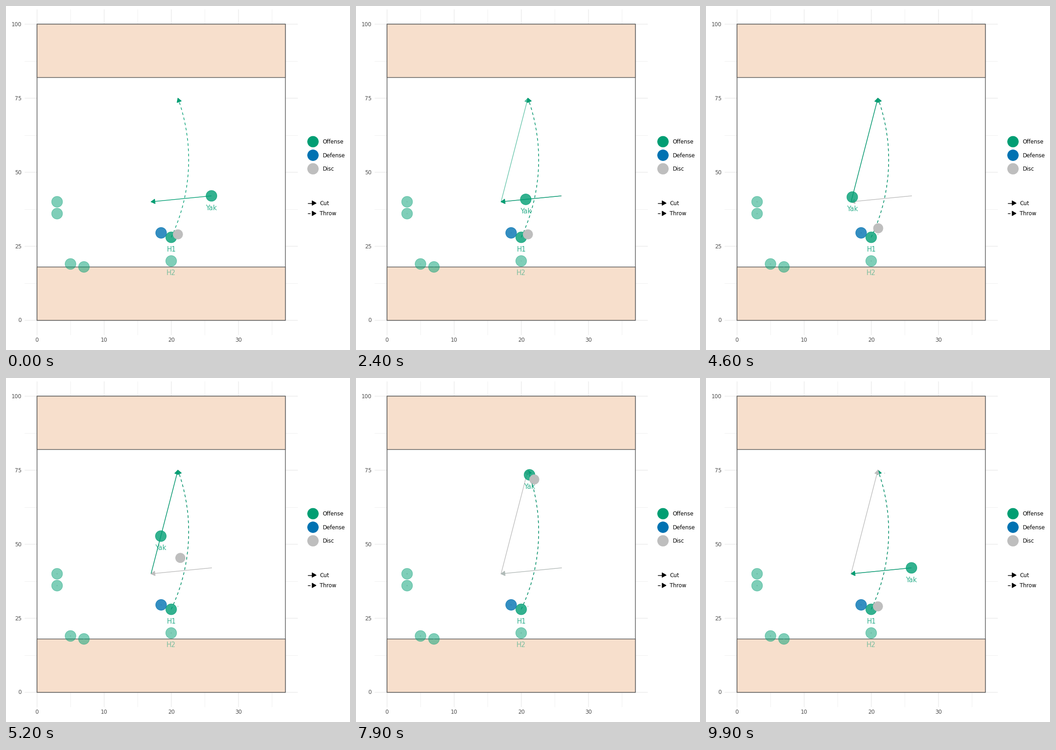
Write a matplotlib script that moves like this. It is 748 px wide and 748 px high and loops after 10 s.

```python
import numpy as np
import matplotlib.pyplot as plt
from matplotlib.animation import FuncAnimation
from matplotlib.patches import Circle, Polygon, Rectangle

SIZE, DPI = 748, 96
GREEN, BLUE, GREY = "#009E73", "#0072B2", "#BEBEBE"
LEFT, RIGHT, TOP, BOTTOM = 40.3, 634.3, 7.3, 715.4   # panel edges in px
LINE = 1.42                                          # base line weight in px

STILL = [(3, 40), (3, 36), (5, 19), (7, 18), (20, 20)]
HANDLER, MARKER = (20, 28), (18.5, 29.5)
CUTTER = [(26, 42), (17, 40), (21, 75)]
DISC = [(21, 29), (21, 29), (22, 74)]
MOVES = [(11, 33), (45, 67), (79, 100)]              # start and end of each move
FRAMES = 100

plt.rcParams["font.family"] = "DejaVu Sans"
fig = plt.figure(figsize=(SIZE / DPI, SIZE / DPI), dpi=DPI, facecolor="white")
ax = fig.add_axes([0, 0, 1, 1])
ax.set(xlim=(0, SIZE), ylim=(SIZE, 0))
ax.axis("off")


def pt(px):
    return px * 72 / DPI


def pos(x, y):
    """Field coordinates to stage pixels."""
    return np.array([LEFT + (RIGHT - LEFT) * (x + 1.85) / 40.7,
                     BOTTOM - (BOTTOM - TOP) * (y + 5) / 110])


def text(x, y, s, size=8.8, **kw):
    """Text with its capitals centred on y."""
    return ax.text(x, y + 0.365 * size * DPI / 72, s, fontsize=size,
                   va="baseline", **kw)


def dot(xy, r, color, alpha=1, z=8):
    return ax.add_patch(Circle(xy, r, fc=color, ec=color, alpha=alpha,
                               lw=pt(0.94), zorder=z))


def arrow(path, color, z, dashed=False):
    path = np.asarray(path, float)
    style = (0, (4, 4)) if dashed else "-"
    line, = ax.plot(*path.T, color=color, lw=pt(LINE), ls=style, zorder=z,
                    solid_capstyle="butt", dash_capstyle="butt")
    tip = path[-1]
    back = path[-2] - tip
    turn = np.arctan2(back[1], back[0]) + np.radians([-30, 30])
    wings = tip + 9.6 * np.c_[np.cos(turn), np.sin(turn)]
    head = ax.add_patch(Polygon(np.vstack([wings[0], tip, wings[1]]), fc=color,
                                ec=color, lw=pt(LINE), joinstyle="round",
                                zorder=z))
    return [line, head]


def arc(a, b, bulge=0.1, n=80):
    """Circular arc from a to b; bulge is its height over the chord."""
    chord = b - a
    length = np.hypot(*chord)
    along = chord / length
    side = np.array([-along[1], along[0]])
    half, rise = length / 2, bulge * length
    radius = (half ** 2 + rise ** 2) / (2 * rise)
    theta = np.linspace(-1, 1, n) * np.arcsin(half / radius)
    u = radius * np.sin(theta)
    v = radius * np.cos(theta) - (radius - rise)
    return (a + b) / 2 + u[:, None] * along + v[:, None] * side


def draw_field():
    for xs, ys, w in [(range(5, 40, 10), np.arange(12.5, 100, 25), LINE / 2),
                      (range(0, 40, 10), range(0, 101, 25), LINE)]:
        style = dict(color="#EBEBEB", lw=pt(w), zorder=0, solid_capstyle="butt")
        for x in xs:
            ax.plot([pos(x, 0)[0]] * 2, [TOP, BOTTOM], **style)
        for y in ys:
            ax.plot([LEFT, RIGHT], [pos(0, y)[1]] * 2, **style)
    for y0, y1, fill in [(0, 100, "white"), (0, 18, "#F7DFCC"), (82, 100, "#F7DFCC")]:
        a, b = pos(0, y0), pos(37, y1)
        ax.add_patch(Rectangle(a, *(b - a), fc=fill, ec="#555555",
                               lw=pt(LINE), zorder=1))
    for x in range(0, 40, 10):
        text(pos(x, 0)[0], 726.2, str(x), ha="center", color="#4D4D4D")
    for y in range(0, 101, 25):
        text(33.7, pos(0, y)[1], str(y), ha="right", color="#4D4D4D")


def draw_legend():
    for y, name, color in [(295, "Offense", GREEN), (324.5, "Defense", BLUE),
                           (354, "Disc", GREY)]:
        dot((667.5, y), 11.8, color)
        text(688.7, y, name, color="black")
    for y, name, dashed in [(428.5, "Cut", False), (451, "Throw", True)]:
        arrow([(655.6, y), (674, y)], "black", 4, dashed)
        text(682.3, y, name, color="black")


def label(xy, s, alpha):
    x, y = pos(xy[0], xy[1] - 4)
    return text(x, y - 0.4, s, 11, ha="center", color=GREEN, alpha=alpha, zorder=10)


draw_field()
draw_legend()

throw = arc(pos(*HANDLER), pos(21, 75))
routes = [[pos(*CUTTER[i]), pos(*CUTTER[i + 1])] for i in range(2)]
arrow(throw, GREEN, 4, dashed=True)
cuts = [arrow(r, GREEN, 6) for r in routes]

# Grey traces left behind by each finished state
traces = []
for i in range(3):
    trace = arrow(throw, GREY, 3, dashed=True)
    if i < 2:
        trace += arrow(routes[i], GREY, 5)
    trace += [dot(pos(*p), 0.47, GREY, 0.5, 7) for p in STILL]
    trace += [dot(pos(*p), 0.47, GREY, 0.8, 7)
              for p in (HANDLER, MARKER, CUTTER[i], DISC[i])]
    traces.append(trace)

for p in STILL:
    dot(pos(*p), 11.85, GREEN, 0.5)
dot(pos(*HANDLER), 11.85, GREEN, 0.8)
dot(pos(*MARKER), 11.85, BLUE, 0.8)
label(HANDLER, "H1", 0.8)
label(STILL[-1], "H2", 0.5)
cutter = dot(pos(*CUTTER[0]), 11.85, GREEN, 0.8)
name = label(CUTTER[0], "Yak", 0.8)
name_offset = np.array(name.get_position()) - pos(*CUTTER[0])
disc = dot(pos(*DISC[0]), 10.4, GREY, z=9)


def phase(t):
    """Current state and progress towards the next one."""
    for i, (start, end) in enumerate(MOVES):
        if t < end:
            return i, max(0, t - start) / (end - start)
    return 0, 0


def between(points, i, p):
    a, b = pos(*points[i]), pos(*points[(i + 1) % 3])
    return a + (b - a) * p


def update(k):
    t = round(k * 100 / (FRAMES - 1))
    state, p = phase(t)
    for (start, _), trace in zip(MOVES, traces):
        for artist in trace:
            artist.set_visible(t > start)
    # A cut fades in ahead of its state and vanishes at once after it
    for i, cut in enumerate(cuts):
        alpha = 1 if state == i else p if (state + 1) % 3 == i else 0
        for artist in cut:
            artist.set_alpha(alpha)
            artist.set_visible(alpha > 0)
    cutter.center = between(CUTTER, state, p)
    name.set_position(cutter.center + name_offset)
    disc.center = between(DISC, state, p)
    return []


anim = FuncAnimation(fig, update, frames=FRAMES, interval=100, repeat=True,
                     repeat_delay=0, blit=False)
plt.show()
```
